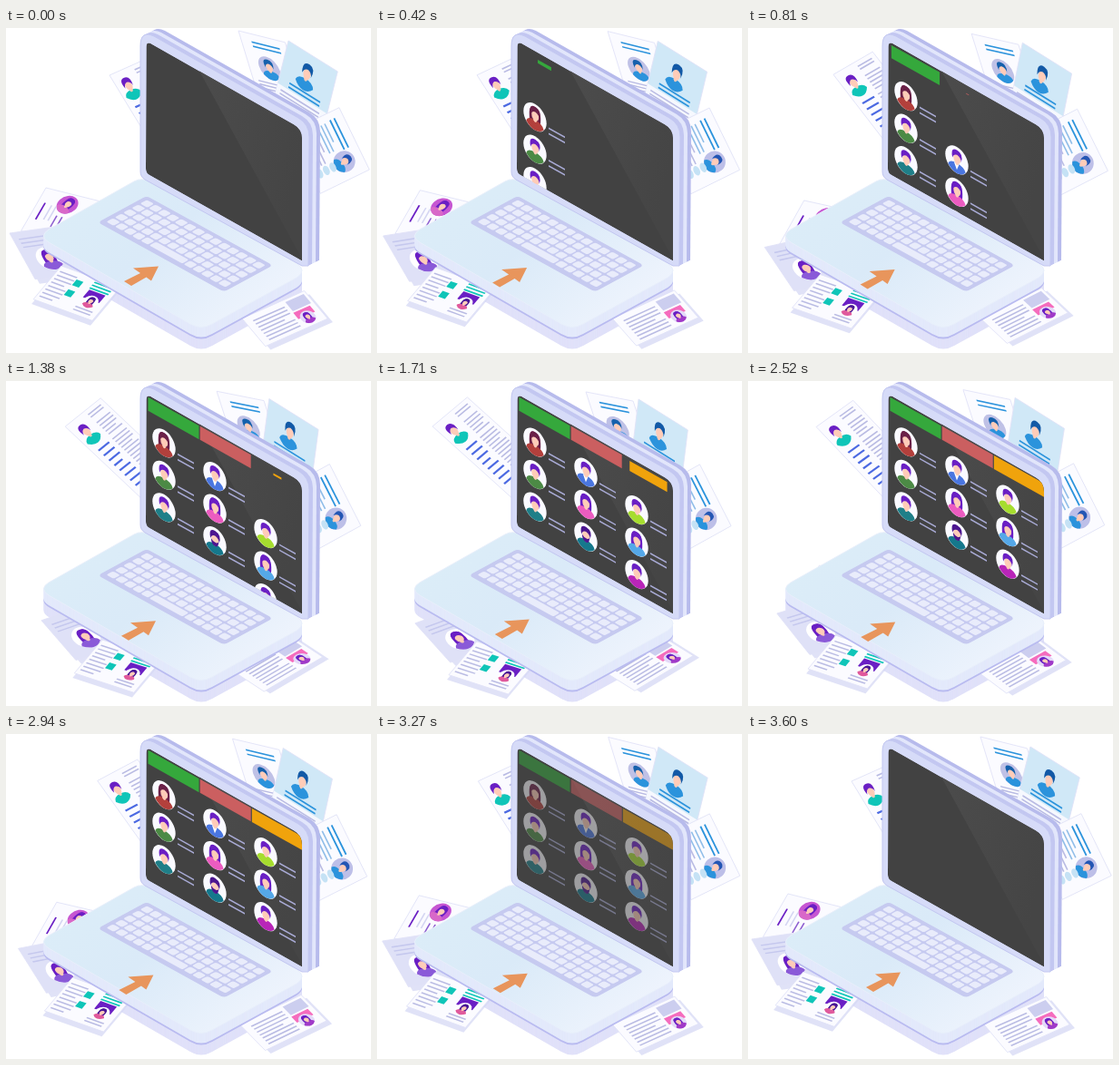
Write an HTML page that moves like this. It is 402 by 358 pixels and loops after 3630 ms.

```html
<!DOCTYPE html>
<html lang="en">
<head>
<meta charset="utf-8">
<title>Resumes collected on a laptop</title>
<style>
html, body { margin: 0; width: 100%; height: 100%; overflow: hidden; background: #fff; }
svg { display: block; width: 402px; height: 358px; }
</style>
</head>
<body>
<svg id="stage" viewBox="0 0 402 358"></svg>
<script>
const LOOP = 3630, HALF = LOOP / 2, RAD = Math.PI / 180;
const GRAY = '#b9bbe3', BLUE = '#2b93dc', INDIGO = '#4b69e2', TEAL = '#0fc5b8';
const PURPLE = '#6a1fc4', SKIN = '#ffccb8';

const clamp = v => Math.max(0, Math.min(1, v));
const mix = (a, b, p) => a + (b - a) * p;
const range = n => [...Array(n).keys()];
const rect = (x, y, w, h, fill, extra = '') =>
  `<rect x="${x}" y="${y}" width="${w}" height="${h}" fill="${fill}" ${extra}/>`;
const path = (d, fill, extra = '') => `<path d="${d}" fill="${fill}" ${extra}/>`;
// n parallel text strokes, lying or upright
const rows = (x, y, len, n, gap, color, h = 1.6) =>
  range(n).map(i => rect(x, y + i * gap, i % 4 == 3 ? len * .75 : len, h, color)).join('');
const cols = (x, y, len, n, gap, color, w = 1.6) =>
  range(n).map(i => rect(x + i * gap, y, w, i % 3 == 2 ? len * .7 : len, color)).join('');

function person(x, y, r, hair, shirt, o = {}) {
  const disc = o.disc ? `<circle r="1" fill="${o.disc}"/>` : '';
  const back = o.long ? path('M-.46 .42Q-.62-.82 0-.78Q.62-.82 .46 .42Z', hair) : '';
  const beard = o.beard ? path('M-.33-.05Q-.3 .4 0 .4Q.3 .4 .33-.05Q.15 .14 0 .1Q-.15 .14-.33-.05Z', hair) : '';
  const collar = o.collar ? path('M-.25 .24L.2 .24L0 .75Z', '#fff') : '';
  return `<g transform="translate(${x} ${y}) rotate(${o.turn || 0}) scale(${r} ${r * (o.tall || 1)})">` + disc + back +
    path('M-.76 .62Q-.66 .22 0 .22Q.66 .22 .76 .62Q.42 1 0 1Q-.42 1-.76 .62Z', shirt) + collar +
    path('M-.13 .05H.15V.28Q0 .5-.13 .28Z', SKIN) +
    `<ellipse cx=".02" cy="-.14" rx=".31" ry=".4" fill="${SKIN}"/>` + beard +
    path('M-.38-.02Q-.58-.78 .04-.76Q.6-.72 .38 0Q.36-.34 .02-.4Q-.28-.36-.38-.02Z', hair) + '</g>';
}

// Pose: x, y, angle of the width axis, angle of the height axis
const papers = [
  { w: 50, h: 120, home: [114, 52, -24, 58.7], far: [61, 50, -40, 42],
    art: person(12, 21, 12, PURPLE, TEAL, { tall: 1.3 }) + rows(27, 5, 18, 2, 4, GRAY) + rows(27, 18, 19, 5, 4.5, GRAY) +
      rows(6, 43, 15, 8, 8, INDIGO, 2.2) + rows(26, 43, 20, 14, 4.5, GRAY) },
  { w: 53, h: 75, home: [256, 3, 14, 73], far: [230, 12, 11, 72],
    art: rows(12, 9, 32, 2, 5, BLUE, 1.8) +
      person(24, 37.5, 12, '#1560ac', BLUE, { disc: '#bfc1e6', tall: 1.15 }) + rows(6, 55, 40, 5, 4, GRAY) },
  { w: 64, h: 82, home: [311, 14, 32, 104], far: [288, 20, 32, 97], tint: '#d0e8f7',
    art: rect(0, 48, 64, 34, '#f6f8fe') + person(30, 23, 15, '#1259a6', BLUE, { tall: 1.1 }) +
      rows(13, 40, 40, 2, 4.5, BLUE, 1.8) + rows(5, 52, 50, 7, 4, GRAY) },
  { w: 60, h: 76, home: [313, 114, -26, 64], far: [303, 121, -29, 63],
    art: cols(44, 8, 36, 2, 5, BLUE, 1.8) + cols(28, 9, 32, 3, 4.5, '#8fbde8') + cols(14, 9, 40, 3, 4.5, GRAY) +
      person(39, 56, 12, '#2456b4', BLUE, { disc: '#bdbfe8', turn: 75 }) +
      range(3).map(i => `<ellipse cx="${9 + i * 8}" cy="56" rx="3.4" ry="5.5" fill="#c5e2f5"/>`).join('') },
  { w: 62, h: 55, low: true, home: [44, 176, 14, 120], far: [91, 213, 10, 118],
    art: person(31, 13, 11, PURPLE, '#d868c8', { disc: '#c656d2', turn: 20, long: 1 }) +
      rect(7, 17, 1.8, 21, PURPLE) + cols(15, 18, 18, 2, 5, '#d4d5f2') + cols(26, 28, 14, 2, 6, '#8d5ed0') },
  { w: 70, h: 58, low: true, home: [4, 226, -8, 61], far: [42, 267, -20, 48], tint: '#dfe1f7',
    art: person(27, 36, 14, PURPLE, '#8a5ad8', { disc: '#fff', long: 1 }) + rows(6, 8, 40, 3, 5, '#c5c8ee') },
  { w: 69, h: 48, low: true, home: [61, 262, 20, 130], far: [110, 287, 18, 130],
    art: rows(3, 6, 20, 8, 5, GRAY) + rect(24, 9, 8, 8, TEAL) + rect(24, 23, 8, 8, TEAL) +
      rows(42, 4, 22, 3, 4, TEAL, 1.8) + rect(43, 15, 19, 11, PURPLE) +
      person(53, 28, 8, '#4a1796', '#e05a9c', { disc: '#fff', long: 1 }) + rows(43, 38, 20, 2, 4, GRAY) },
  { w: 75, h: 40, low: true, home: [260, 320, -24, 50], far: [250, 320, -31, 32],
    art: rows(8, 7, 38, 7, 4.5, GRAY) + rect(50, 3, 22, 13, '#ccceef') + rect(49, 18, 20, 9, '#f56cbd') +
      person(59, 29, 8, PURPLE, '#a03ac8', { disc: '#e4d9f8', long: 1 }) }
];

const lidPath = 'M148 20Q148 2 163 9L322 99Q334 106 334 120L333 262L326 262L153 167Q148 164 148 158Z';
const glassPath = 'M154.5 21Q154.5 14 161 18L317 106.5Q326 111.5 326 122L326 256.5L158 162Q154 160 154 155Z';
const basePath = 'M47 222Q36 229 47 236L203 326Q215 333 227 326L320 275Q332 267 320 259L160 170Q150 164 141 169Z';

const lists = [
  { head: '#35a83c', people: [['#6b2148', '#b3403c', { long: 1 }], [PURPLE, '#4c8a45', {}], [PURPLE, '#1f7f88', {}]] },
  { head: '#cb5f60', people: [[PURPLE, '#4a76e0', { collar: 1 }], [PURPLE, '#ec5cc0', { long: 1 }], ['#4c1690', '#15788c', { beard: 1 }]] },
  { head: '#f0a30c', people: [[PURPLE, '#a6dd2e', {}], [PURPLE, '#55a8e8', { long: 1 }], [PURPLE, '#b825b8', {}]] }
];

function list(l, i) {
  const x = 19 + 56 * i;
  const folk = l.people.map(([hair, shirt, o], j) => {
    const y = 42.6 + 35.5 * j;
    return person(x, y, 12.7, hair, shirt, { ...o, disc: '#fafaff', tall: 1.14 }) +
      rows(x + 15, y + 3, 18, 2, 6, '#a9abd6', 1.7);
  }).join('');
  return `<g class="folk">${folk}</g>` + rect(-28, -7.5, 56, 15, l.head, 'class="head"');
}

function keyboard() {
  let keys = '';
  for (let r = 0; r < 5; r++) {
    for (let c = 0; c < 14; c++) {
      if (r == 4 && c > 4 && c < 9) continue;
      keys += rect(4 + c * 9.45, 4 + r * 9.5, 8, 7.6, '#e9ecfb', 'rx="2"');
    }
  }
  keys += rect(4 + 5 * 9.45, 42, 36.3, 7.6, '#e9ecfb', 'rx="2"');
  return '<g transform="matrix(1 .55 -.98 .53 155 185)">' +
    rect(0, 0, 139, 55, '#c6caf0', 'rx="4"') + keys + '</g>';
}

const sheet = p => '<g class="paper">' +
  (p.low ? rect(2, 6, p.w, p.h, '#d6d8f5', 'opacity=".75"') : '') +
  rect(0, 0, p.w, p.h, p.tint || '#fbfbff', 'stroke="#e0e2f7" stroke-width=".8"') + p.art + '</g>';

// Thickness: copies of one outline, farthest first
const stack = (d, from, to, dx, dy, color) => range(from - to + 1).map(i => from - i).map(i =>
  path(d, color(i), `transform="translate(${i * dx} ${i * dy})"`)).join('');

const stage = document.getElementById('stage');
stage.innerHTML = `
<defs>
  <linearGradient id="deck" x1="0" y1="0" x2="1" y2=".7">
    <stop offset="0" stop-color="#dceef8"/><stop offset=".5" stop-color="#daeaf8"/><stop offset="1" stop-color="#eff4fd"/>
  </linearGradient>
  <linearGradient id="glow" x1="0" y1="0" x2="1" y2=".4">
    <stop offset="0" stop-color="#4c4c4c"/><stop offset="1" stop-color="#454545"/>
  </linearGradient>
  <clipPath id="glass"><path d="${glassPath}"/></clipPath>
</defs>
${stack(basePath, 24, 14, 0, 1, () => '#e0e1f9')}
${papers.map(sheet).join('')}
${stack(basePath, 13, 1, 0, 1, i => i > 11 ? '#b9bbf0' : '#e3e9fb')}
${path(basePath, 'url(#deck)', 'stroke="#e8effb" stroke-width="1"')}
${keyboard()}
${path('M130 279L148 270L140 264.5L168 262.5L160 278.5L154.5 274.5L138 284Z', '#e8955c', 'id="arrow"')}
${stack(lidPath, 12, 0, 1, -.5, i => i > 8 ? '#b7bbec' : i > 4 ? '#e2e6fb' : '#c3c7f1')}
${path(lidPath, '#d6dbf8', 'stroke="#c3c8f1" stroke-width="1"')}
<g clip-path="url(#glass)">
  ${path(glassPath, '#424242')}
  ${path('M209 40L328 105V258Z', 'url(#glow)')}
  <g id="board" transform="matrix(1 .56 0 1 155 14)">${lists.map(list).join('')}</g>
</g>`;

const sheets = [...stage.querySelectorAll('.paper')];
const folks = [...stage.querySelectorAll('.folk')];
const heads = [...stage.querySelectorAll('.head')];
const arrow = document.getElementById('arrow');
const board = document.getElementById('board');

const ease = u => u < .5 ? .5 * (2 * u) ** 2.5 : 1 - .5 * (2 - 2 * u) ** 2.5;

function draw(t) {
  const spread = ease(1 - Math.abs(t / HALF - 1));
  papers.forEach((p, i) => {
    const [x, y, a, b] = p.home.map((v, k) => mix(v, p.far[k], spread));
    const m = [Math.cos(a * RAD), Math.sin(a * RAD), Math.cos(b * RAD), Math.sin(b * RAD), x, y];
    sheets[i].setAttribute('transform', `matrix(${m.map(v => v.toFixed(4)).join(' ')})`);
  });

  const pull = (1 - Math.cos(2 * Math.PI * t / HALF)) / 2;
  arrow.setAttribute('transform', `translate(${-6.5 * pull} ${3.5 * pull})`);

  lists.forEach((l, i) => {
    const since = t - 30 - 510 * i;
    const drop = since < 0 ? 150 : 120 * Math.exp(-.00347 * since);
    folks[i].setAttribute('transform', `translate(0 ${drop.toFixed(2)})`);
    const grow = clamp((t - 270 - 510 * i) / 570);
    heads[i].setAttribute('transform', `translate(${29.5 + 57.2 * i} 10.5) scale(${grow})`);
    heads[i].setAttribute('visibility', grow ? 'visible' : 'hidden');
  });
  board.setAttribute('opacity', 1 - clamp((t - 3120) / 300));
}

const start = performance.now();
function tick() {
  draw((performance.now() - start) % LOOP);
  requestAnimationFrame(tick);
}
draw(0);
requestAnimationFrame(tick);
</script>
</body>
</html>
```
